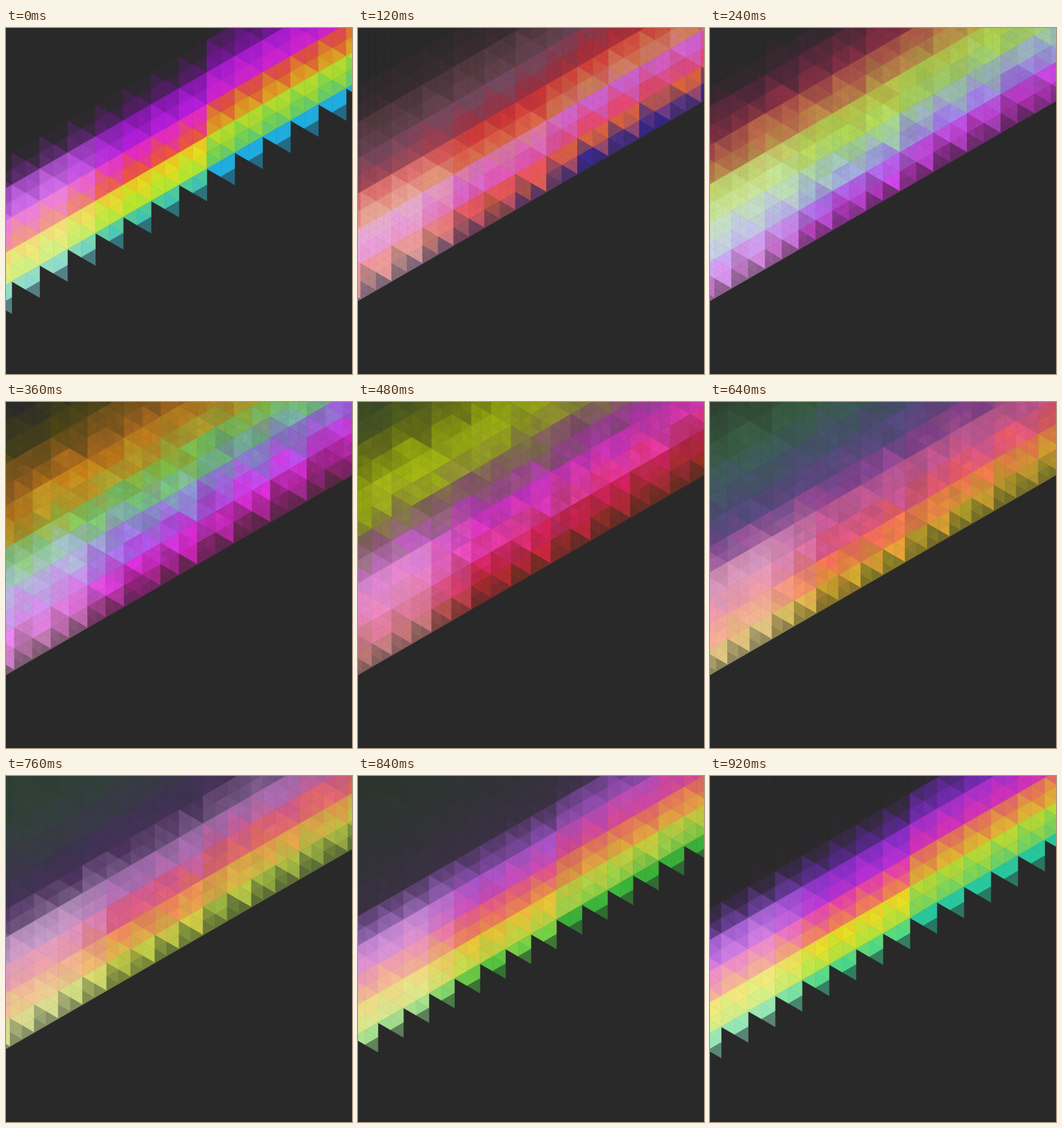
An HTML page with a canvas that plays this animation: 540 by 540 pixels, repeating every 960 ms.

```html
<!DOCTYPE html>
<html lang="en">
<head>
<meta charset="utf-8">
<title>Triangle spectrum</title>
<style>
html, body { margin: 0; width: 100%; height: 100%; overflow: hidden; background: #292929; }
canvas { display: block; width: 540px; height: 540px; }
</style>
</head>
<body>
<canvas id="stage" width="540" height="540"></canvas>
<script>
const ctx = document.getElementById('stage').getContext('2d');
const LOOP = 960, STEP = 40, MID = 270, BG = 41, R3 = Math.sqrt(3);

// Colours across the band, by vertical distance from the diagonal.
const DIST = [-400, -340, -290, -250, -210, -175, -145, -115, -85, -55, -25, 0];
const key = (at, jitter, colours) => ({ at, jitter, hsv: colours.split(' ').map(toHsv) });
const KEYS = [
  key(0, 0, '292929 292929 292929 292929 2c292e 6a168a a81cd8 e023d8 ea5a28 e6ea20 86e040 1eb4ea'),
  key(240, .6, '292929 292929 4a2838 8a3045 b86a48 b8b848 b0d850 a0d088 a0b8d8 a070e8 d838e0 902890'),
  key(360, 1, '292c29 4a4416 8a5a20 c07818 a8a030 70c048 78b8a8 9078d8 b050e8 dc30dc a81c88 782858'),
  key(480, 1, '3c4c24 606818 90a010 98a818 7c6c4c 885070 b030b8 e038b8 e03c98 cc2058 b82c28 8c3020'),
  key(640, .8, '2f4434 385c40 3c5858 4a4a70 584a80 8c4090 b85890 d05898 e85868 f08048 d8b428 a8a028'),
  key(760, .5, '2f3f34 30403a 383a44 3c3450 48305a 806090 b070b8 d85890 e87060 e8b048 c0d848 80a040'),
  key(920, .1, '292929 292929 292929 292929 2d2a30 6028a0 a030d8 e030c0 f08050 e6e420 90e050 28d0a5')
];
KEYS.push({ ...KEYS[0], at: LOOP });

const clamp = x => Math.max(0, Math.min(1, x));
const mix = (a, b, k) => a + (b - a) * k;

function toHsv(hex) {
  const [r, g, b] = [0, 2, 4].map(i => parseInt(hex.substr(i, 2), 16));
  const top = Math.max(r, g, b), d = top - Math.min(r, g, b);
  if (!d) return [0, 0, top];
  const h = top === r ? (g - b) / d : top === g ? 2 + (b - r) / d : 4 + (r - g) / d;
  return [(h * 60 + 360) % 360, d / top, top];
}

function toRgb([h, s, v]) {
  return [5, 3, 1].map(n => {
    const k = (n + h / 60 + 12) % 6;
    return v * (1 - s * clamp(Math.min(k, 4 - k)));
  });
}

function mixHsv(a, b, k) {
  const ha = a[1] < .08 ? b[0] : a[0], hb = b[1] < .08 ? ha : b[0];
  const turn = (hb - ha + 540) % 360 - 180;
  return [(ha + turn * k + 360) % 360, mix(a[1], b[1], k), mix(a[2], b[2], k)];
}

function hash(a, b, c) {
  let n = Math.imul(a, 374761393) ^ Math.imul(b, 668265263) ^ Math.imul(c, 1274126177);
  n = Math.imul(n ^ (n >>> 13), 1103515245);
  return ((n ^ (n >>> 16)) >>> 0) / 4294967296;
}

const lattice = (w, ox = 0, oy = 0) => ({ w, h: 2 * w / R3, ox, oy, shift: oy + ox / R3 });

// The triangle of a lattice that holds the point.
function locate(l, x, y) {
  const X = (x - l.ox) / l.w, V = (y - l.oy) / l.h + X / 2;
  const c = Math.floor(X), r = Math.floor(V), left = V - r < X - c;
  return {
    c, r, side: left ? 1 : 2,
    x: l.ox + (c + .5) * l.w,
    v: (r + (left ? 1 : 2) / 3) * l.h + l.shift
  };
}

function ramp(stops, v) {
  let i = 0;
  while (i < DIST.length - 2 && v > DIST[i + 1]) i++;
  const k = clamp((v - DIST[i]) / (DIST[i + 1] - DIST[i]));
  return stops[i].map((a, j) => mix(a, stops[i + 1][j], k));
}

function tint(tri, id, stops, jitter) {
  const n = hash(tri.c, tri.r, tri.side + id * 7) - .5;
  const m = hash(tri.r, tri.c, tri.side + id * 13) - .5;
  const drift = 20 * (1 - jitter * .7) * clamp((tri.x - 285) / 40 + 7);
  const right = clamp((tri.x - 30) / 30);
  const v = tri.v + right * drift + jitter * n * 44;
  const glow = .4 * clamp((-90 - tri.x) / 90) * clamp((tri.v + 200) / 70);
  const gain = 1 + jitter * m * .35 - right * .06;
  return ramp(stops, v).map(a => {
    const lit = BG + (a - BG) * gain;
    return lit + (255 - lit) * glow;
  });
}

function draw(step) {
  const t = step * STEP, p = step ? (step + 1) / 25 : 0;
  const s = step ? 21.63 * 2 ** p : 21.75, h = 2 * s / R3;
  const early = step < 3, late = step > 20;

  const i = KEYS.findIndex(f => f.at > t) - 1, a = KEYS[i], b = KEYS[i + 1];
  const k = (t - a.at) / (b.at - a.at);
  const jitter = mix(a.jitter, b.jitter, k);
  const stops = a.hsv.map((c, j) => toRgb(mixHsv(c, b.hsv[j], k)));

  const layers = [
    early ? lattice(2 * s, 0, h) : lattice(2 * s, -s, h / 2),
    lattice(s, 0, late ? h / 2 : 0),
    lattice(s / 2)
  ];
  const weights = [.6 * (1 - p), .4 + .2 * p, .4 * p];
  const gate = early ? 0 : late ? 1 : -1;

  function shade(x, y) {
    const out = [BG, BG, BG], below = y + x / R3 > 0;
    const tris = layers.map(l => locate(l, x, y));
    if (gate < 0 ? below : tris[gate].v > 2) return null;
    layers.forEach((l, j) => {
      if (weights[j] < .005) return;
      const tri = tris[j];
      let alpha = 1;
      if (gate >= 0) alpha = below ? .5 : 1;
      else if (tri.v > 0) alpha = 0;
      else if (tri.v > -.4 * l.h) alpha = .6;
      const c = tint(tri, j, stops, jitter);
      for (let q = 0; q < 3; q++) out[q] += weights[j] * alpha * (c[q] - BG);
    });
    return out.map(Math.round);
  }

  const e = early ? s : s / 2, eh = 2 * e / R3, cols = Math.ceil(MID / e);
  const px = X => MID + X * e, py = (X, V) => MID + (V - X / 2) * eh;

  function cell(pts) {
    const cx = pts.reduce((n, q) => n + q[0], 0) / 3, cv = pts.reduce((n, q) => n + q[1], 0) / 3;
    const rgb = shade(cx * e, (cv - cx / 2) * eh);
    if (!rgb) return;
    ctx.fillStyle = ctx.strokeStyle = `rgb(${rgb})`;
    ctx.beginPath();
    pts.forEach(([X, V]) => ctx.lineTo(px(X), py(X, V)));
    ctx.closePath();
    ctx.fill();
    ctx.stroke();
  }

  ctx.fillStyle = '#292929';
  ctx.fillRect(0, 0, 540, 540);
  ctx.lineWidth = .6;
  ctx.lineJoin = 'round';
  for (let c = -cols; c < cols; c++) {
    const first = Math.floor(-MID / eh + c / 2) - 1, last = Math.ceil(30 / eh);
    for (let r = first; r <= last; r++) {
      cell([[c, r], [c + 1, r], [c + 1, r + 1]]);
      cell([[c, r], [c, r + 1], [c + 1, r + 1]]);
    }
  }
}

let start, shown = -1;
function tick(now) {
  if (start === undefined) start = now;
  const step = Math.floor((now - start) % LOOP / STEP);
  if (step !== shown) draw(shown = step);
  requestAnimationFrame(tick);
}
draw(0);
requestAnimationFrame(tick);
</script>
</body>
</html>
```
